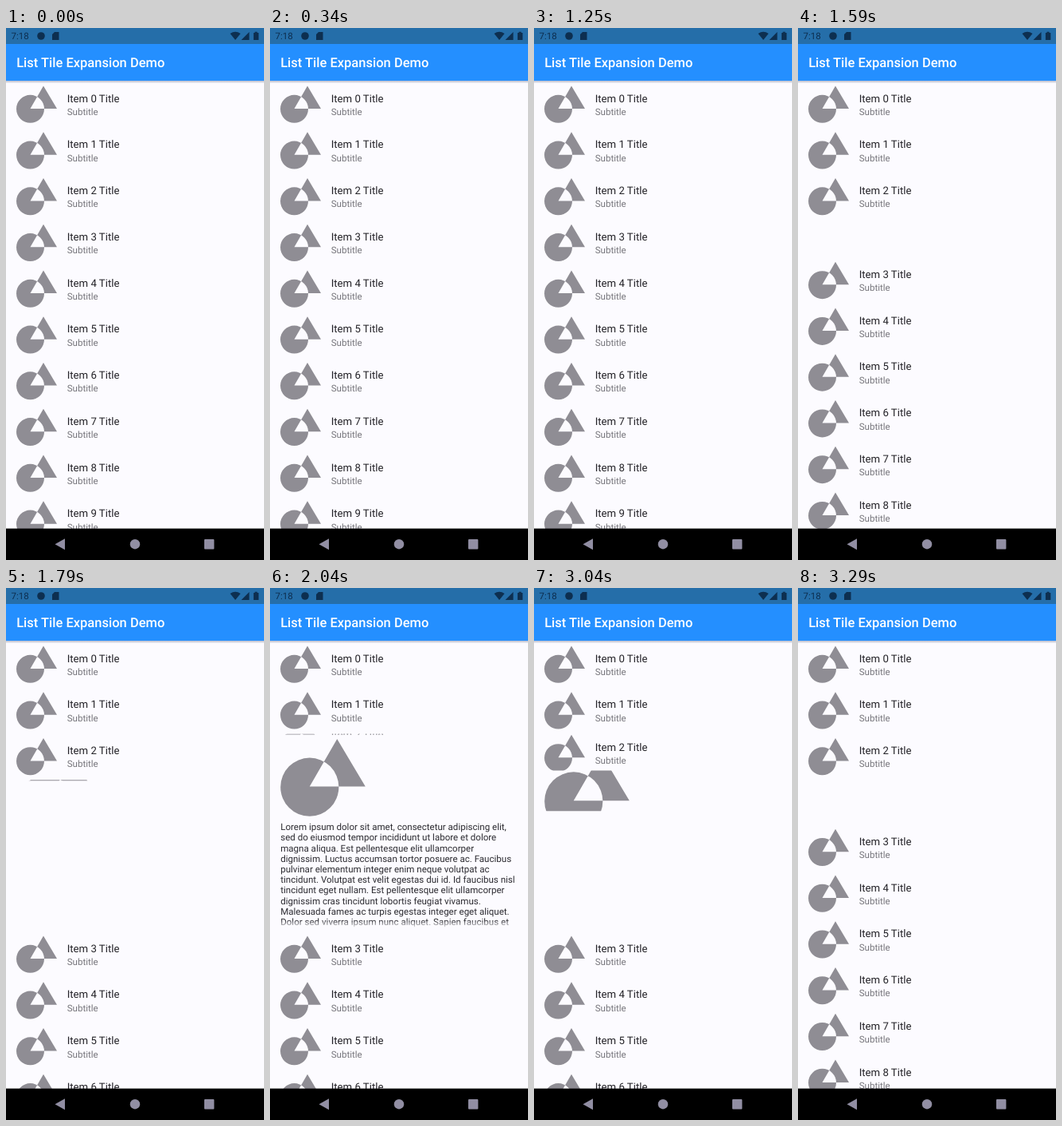
Animation of 324 by 666 pixels, one loop 3340 ms. Source, as an HTML page:

```html
<!DOCTYPE html>
<html lang="en">
<head>
<meta charset="utf-8">
<title>List Tile Expansion Demo</title>
<style>
html, body { margin: 0; width: 100%; height: 100%; overflow: hidden; background: #fcfbff; }
svg { display: block; width: 100%; height: 100%; }
text { font-family: Roboto, "Noto Sans", sans-serif; text-rendering: geometricPrecision; }
.clock { font-size: 11.55px; fill: #0d2f50; }
.bar { font-size: 16.5px; font-weight: 500; fill: #fff; }
.title { font-size: 13.2px; fill: #242328; }
.sub { font-size: 11.55px; fill: #77767c; }
.body { font-size: 11.55px; fill: #2c2b31; }
.dark { fill: #0d2f50; }
.nav { fill: #918ea3; }
</style>
</head>
<body>
<svg viewBox="0 0 324 666" preserveAspectRatio="none">
  <defs>
    <path id="shapes" fill="#8f8d94" fill-rule="evenodd"
      d="M34 0L51 28.5H17.5ZM0 28.8a17.5 17.5 0 1 0 35 0a17.5 17.5 0 1 0 -35 0Z"/>
    <linearGradient id="shade" x2="0" y2="1">
      <stop stop-color="#b9bac9"/><stop offset="1" stop-color="#fcfbff"/>
    </linearGradient>
    <linearGradient id="fade" x2="0" y2="1">
      <stop stop-color="#fcfbff" stop-opacity="0"/><stop offset="1" stop-color="#fcfbff"/>
    </linearGradient>
    <clipPath id="headClip"><rect id="headBox" width="324"/></clipPath>
    <clipPath id="moreClip"><rect id="moreBox" width="324"/></clipPath>
  </defs>

  <rect width="324" height="666" fill="#fcfbff"/>
  <g id="list"></g>
  <g clip-path="url(#moreClip)"><g id="more"></g></g>

  <rect y="66" width="324" height="3.5" fill="url(#shade)"/>
  <rect y="20" width="324" height="46" fill="#248fff"/>
  <rect width="324" height="20" fill="#256ea9"/>
  <text class="bar" x="13.2" y="49.3">List Tile Expansion Demo</text>

  <g class="dark">
    <text class="clock" x="6.5" y="14.2">7:18</text>
    <circle cx="44" cy="10" r="4.8"/>
    <path d="M61 5H66.5V15H58V8Z"/>
    <path d="M281.5 7Q288 2.6 294.5 7L288 15Z"/>
    <path d="M305.5 5V15H295.5Z"/>
    <path d="M312.5 4.8H315.5V6H317.3V15H310.9V6H312.5Z"/>
  </g>

  <rect y="626.6" width="324" height="40" fill="#000"/>
  <g class="nav">
    <path d="M61.5 646.2L74 639.2V653.2Z"/>
    <circle cx="162" cy="646.2" r="6.2"/>
    <rect x="249" y="640" width="12.4" height="12.4" rx="1"/>
  </g>
</svg>
<script>
const LOOP = 3340, ROW = 57.75, TOP = 67.2, EXTRA = 189.8, OPEN = 2, COUNT = 10;
const FULL = 246;               // height of the expanded panel
const HEAD_SHIFT = 20, MORE_SHIFT = 35;
const openTop = TOP + ROW * OPEN;

// [start, end, from, to]
const GAP = [[1500, 1780, 0, 1], [3120, 3387, 1, 0]];
const SWAP = [[1780, 2060, 0, 1], [2850, 3120, 1, 0]];

const LINES = [
  "Lorem ipsum dolor sit amet, consectetur adipiscing elit,",
  "sed do eiusmod tempor incididunt ut labore et dolore",
  "magna aliqua. Est pellentesque elit ullamcorper",
  "dignissim. Luctus accumsan tortor posuere ac. Faucibus",
  "pulvinar elementum integer enim neque volutpat ac",
  "tincidunt. Volutpat est velit egestas dui id. Id faucibus nisl",
  "tincidunt eget nullam. Est pellentesque elit ullamcorper",
  "dignissim cras tincidunt lobortis feugiat vivamus.",
  "Malesuada fames ac turpis egestas integer eget aliquet.",
  "Dolor sed viverra ipsum nunc aliquet. Sapien faucibus et"
];

const $ = id => document.getElementById(id);
const moveY = (el, y) => el.setAttribute("transform", `translate(0 ${y})`);

function setBox(el, y, h) {
  el.setAttribute("y", y);
  el.setAttribute("height", Math.max(0, h));
}

const tile = i => `
  <g ${i === OPEN ? 'clip-path="url(#headClip)"' : ""}><g class="tile">
    <use href="#shapes" x="13" y="5.3"/>
    <text class="title" x="76.7" y="25.4">Item ${i} Title</text>
    <text class="sub" x="76.7" y="41.8">Subtitle</text>
  </g></g>`;

$("list").innerHTML = Array.from({ length: COUNT }, (_, i) => tile(i)).join("");
$("more").innerHTML = `
  <use href="#shapes" transform="translate(13.2 6) scale(2.09)"/>
  ${LINES.map((s, i) => `<text class="body" x="13.2" y="${120.1 + 13.2 * i}">${s}</text>`).join("")}
  <rect y="233" width="324" height="10" fill="url(#fade)"/>`;
const tiles = [...document.querySelectorAll(".tile")];

function track(steps, t) {
  let v = steps[0][2];
  for (const [start, end, from, to] of steps) {
    if (t < start) break;
    const x = Math.min(1, (t - start) / (end - start));
    v = from + (to - from) * x * x * (3 - 2 * x);
  }
  return v;
}

function draw(t) {
  const gap = EXTRA * track(GAP, t), p = track(SWAP, t);
  const headH = p ? ROW * (1 - p) : ROW + 1;
  tiles.forEach((el, i) => {
    const shift = i > OPEN ? gap : i === OPEN ? -HEAD_SHIFT * p : 0;
    moveY(el, TOP + ROW * i + shift);
  });
  setBox($("headBox"), openTop, headH);
  const y = openTop + ROW * (1 - p);
  setBox($("moreBox"), y, FULL * p);
  moveY($("more"), y - MORE_SHIFT * (1 - p));
}

const begin = performance.now();
function tick() {
  draw((performance.now() - begin) % LOOP);
  requestAnimationFrame(tick);
}
draw(0);
requestAnimationFrame(tick);
</script>
</body>
</html>
```
